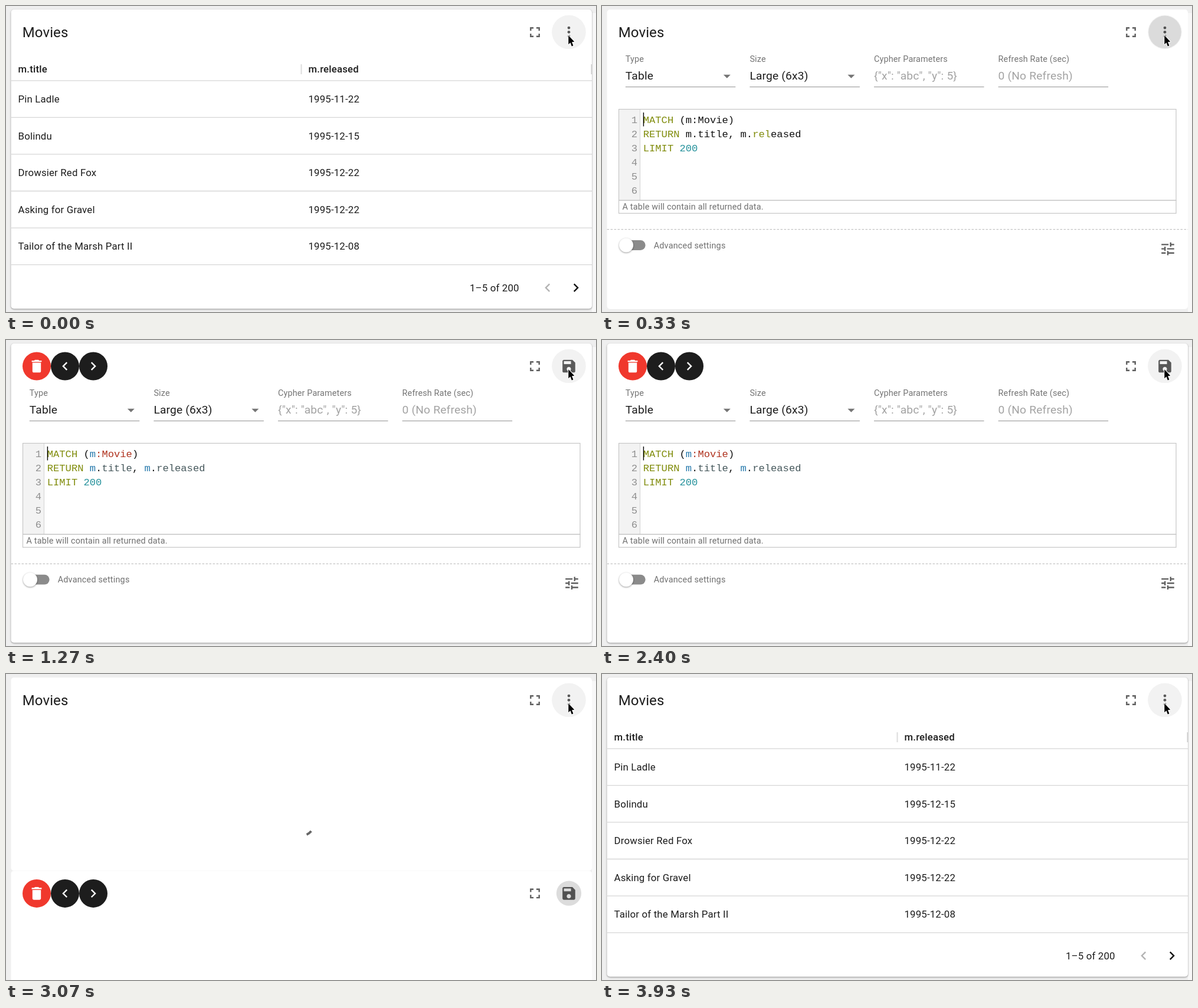
An HTML page with a canvas that plays this animation: 1000x520 px, repeating every 3990 ms.

```html
<!DOCTYPE html>
<html lang="en">
<head>
<meta charset="utf-8">
<title>Movies card</title>
<style>
  html, body { margin: 0; width: 100%; height: 100%; overflow: hidden; background: #efefef; }
  canvas { display: block; width: 1000px; height: 520px; }
</style>
</head>
<body>
<canvas id="stage"></canvas>
<script>
const W = 1000, H = 520, LOOP = 3990, TICK = 200 / 3;
const canvas = document.getElementById('stage');
const ctx = canvas.getContext('2d');
const dpr = window.devicePixelRatio || 1;
canvas.width = W * dpr;
canvas.height = H * dpr;

const SANS = 'Roboto, sans-serif';
const MONO = '"Liberation Mono", monospace';
const ICON = 'rgba(0,0,0,.63)', MUTED = '#757575', INK = '#1c1c1c';
const CARD = { x: 8.5, y: 6, w: 984.5, h: 508.5 };
const MORE = { x: 954, y: 44.3 };
const CLOSE_START = 2917, CLOSE_END = 3279, SPIN_START = 2927;

const ICONS = {
  full: 'M7 14H5v5h5v-2H7v-3zm-2-4h2V7h3V5H5v5zm12 7h-3v2h5v-5h-2v3zM14 5v2h3v3h2V5h-5z',
  left: 'M15.41 7.41L14 6l-6 6 6 6 1.41-1.41L10.83 12z',
  right: 'M10 6L8.59 7.41 13.17 12l-4.58 4.59L10 18l6-6z',
  trash: 'M6 19c0 1.1.9 2 2 2h8c1.1 0 2-.9 2-2V7H6v12zM19 4h-3.5l-1-1h-5l-1 1H5v2h14V4z',
  save: 'M17 3H5c-1.11 0-2 .9-2 2v14c0 1.1.89 2 2 2h14c1.1 0 2-.9 2-2V7l-4-4zm-5 16c-1.66 0-3-1.34-3-3s1.34-3 3-3 3 1.34 3 3-1.34 3-3 3zm3-10H5V5h10v4z',
  tune: 'M3 17v2h6v-2H3zM3 5v2h10V5H3zm10 16v-2h8v-2h-8v-2h-2v6h2zM7 9v2H3v2h4v2h2V9H7zm14 4v-2H11v2h10zm-6-4h2V7h4V5h-4V3h-2v6z',
  drop: 'M7 10l5 5 5-5z'
};
for (const key in ICONS) ICONS[key] = new Path2D(ICONS[key]);

const ROWS = [
  ['Pin Ladle', '1995-11-22'],
  ['Bolindu', '1995-12-15'],
  ['Drowsier Red Fox', '1995-12-22'],
  ['Asking for Gravel', '1995-12-22'],
  ['Tailor of the Marsh Part II', '1995-12-08']
];

const FIELDS = [
  ['Type', 'Table', true],
  ['Size', 'Large (6x3)', true],
  ['Cypher Parameters', '{"x": "abc", "y": 5}', false],
  ['Refresh Rate (sec)', '0 (No Refresh)', false]
];

const C = { k: '#808c0c', n: '#22909a', v: '#2478ab', l: '#b0331f', p: '#46585c', t: '#111' };
const LIMIT = [['k', 'LIMIT '], ['n', '200']];
const PLAIN_CODE = [
  [['k', 'MATCH'], ['t', ' (m:Movie)']],
  [['k', 'RETURN'], ['t', ' m.title, m.'], ['k', 'rel'], ['t', 'eased']],
  LIMIT
];
const CYPHER_CODE = [
  [['k', 'MATCH'], ['t', ' ('], ['v', 'm'], ['l', ':Movie'], ['t', ')']],
  [['k', 'RETURN'], ['v', ' m'], ['t', '.'], ['p', 'title'], ['t', ', '], ['v', 'm'], ['t', '.'], ['p', 'released']],
  LIMIT
];

const clamp = v => Math.max(0, Math.min(1, v));
const ramp = (t, a, b) => clamp((t - a) / (b - a));

function bezier(x1, y1, x2, y2) {
  const at = (a, b, s) => 3 * a * s * (1 - s) ** 2 + 3 * b * s * s * (1 - s) + s ** 3;
  return x => {
    let lo = 0, hi = 1;
    for (let i = 0; i < 24; i++) {
      const mid = (lo + hi) / 2;
      if (at(x1, x2, mid) < x) lo = mid; else hi = mid;
    }
    return at(y1, y2, (lo + hi) / 2);
  };
}
const standard = bezier(.4, 0, .2, 1);
const inOut = bezier(.42, 0, .58, 1);

function text(str, x, y, size, color, { weight = 400, font = SANS, gap = .18, align = 'left' } = {}) {
  ctx.font = `${weight} ${size}px ${font}`;
  ctx.letterSpacing = gap + 'px';
  ctx.textAlign = align;
  ctx.fillStyle = color;
  ctx.fillText(str, x, y);
}

function icon(name, x, y, color) {
  ctx.save();
  ctx.translate(x, y);
  ctx.scale(1.2, 1.2);
  ctx.translate(-12, -12);
  ctx.fillStyle = color;
  ctx.fill(ICONS[name]);
  ctx.restore();
}

function disc(x, y, r, color) {
  ctx.fillStyle = color;
  ctx.beginPath();
  ctx.arc(x, y, r, 0, Math.PI * 2);
  ctx.fill();
}

function line(x1, y1, x2, y2, color, width = 1.2) {
  ctx.strokeStyle = color;
  ctx.lineWidth = width;
  ctx.beginPath();
  ctx.moveTo(x1, y1);
  ctx.lineTo(x2, y2);
  ctx.stroke();
}

function panel(y, h, shadow) {
  ctx.save();
  if (shadow) {
    ctx.shadowColor = 'rgba(0,0,0,.42)';
    ctx.shadowBlur = 2.6 * dpr;
    ctx.shadowOffsetY = 1 * dpr;
  }
  ctx.fillStyle = '#fff';
  ctx.beginPath();
  ctx.roundRect(CARD.x, y, CARD.w, h, 5);
  ctx.fill();
  ctx.restore();
}

function pointer() {
  ctx.save();
  ctx.translate(953.3, 50);
  ctx.scale(.93, .97);
  ctx.beginPath();
  [[0, 0], [0, 15.8], [3.5, 12.6], [6, 19], [8.8, 17.8], [6.2, 11.6], [10.8, 11.2]]
    .forEach(([x, y]) => ctx.lineTo(x, y));
  ctx.closePath();
  ctx.lineJoin = 'round';
  ctx.lineWidth = 2.2;
  ctx.strokeStyle = '#fff';
  ctx.stroke();
  ctx.fillStyle = '#000';
  ctx.fill();
  ctx.restore();
}

function viewHeader() {
  text('Movies', 27.7, 52.5, 24, INK, { gap: .12 });
  icon('full', 896.5, 44.5, ICON);
  for (const dy of [-7.2, 0, 7.2]) disc(MORE.x, MORE.y + dy, 2.4, ICON);
}

function settingsHeader() {
  disc(52, 44.5, 24, '#f0382d');
  disc(100, 44.5, 24, '#1d1d1d');
  disc(148, 44.5, 24, '#1d1d1d');
  icon('trash', 52, 44.5, '#fff');
  icon('left', 100, 44.5, '#fff');
  icon('right', 148, 44.5, '#fff');
  icon('full', 896.5, 44.5, ICON);
  icon('save', MORE.x, 44.5, ICON);
}

function table() {
  const right = CARD.x + CARD.w;
  text('m.title', 20.5, 113, 16.8, INK, { weight: 500 });
  text('m.released', 512.5, 113, 16.8, INK, { weight: 500 });
  line(500.5, 99, 500.5, 116, '#dcdcdc', 2);
  line(992.3, 99, 992.3, 116, '#cfcfcf', 1.6);
  for (let i = 0; i <= ROWS.length; i++) {
    const y = 126.8 + i * 62.56;
    line(CARD.x, y, right, y, '#d6d6d6', 1.3);
  }
  ROWS.forEach(([title, date], i) => {
    const y = 164 + i * 62.56;
    text(title, 20.5, y, 16.8, INK);
    text(date, 512.5, y, 16.8, INK);
  });
  text('1–5 of 200', 786, 484.8, 16.8, INK);
  icon('left', 918, 478.8, '#b3b3b3');
  icon('right', 966, 478.8, '#111');
}

function spinner(t) {
  const turn = Math.PI * 2, len = 126.9, p = (t - SPIN_START) / 1400;
  if (p < 0) return;
  const grow = inOut(clamp(p * 2)), chase = inOut(clamp(p * 2 - 1));
  const start = p + (15 * grow + 110 * chase) / len;
  const dash = Math.min(1 + 99 * grow, len - 15 * grow - 110 * chase) / len;
  ctx.strokeStyle = '#666';
  ctx.lineWidth = 3.9;
  ctx.beginPath();
  ctx.arc(500.3, 253, 22, start * turn, (start + dash) * turn);
  ctx.stroke();
}

function editor(code, caret) {
  ctx.fillStyle = '#f3f3f3';
  ctx.fillRect(28.5, 175.5, 36, 154.5);
  line(64.5, 175.5, 64.5, 330, '#d8d8d8');
  ctx.strokeStyle = '#c6c6c6';
  ctx.lineWidth = 1.2;
  ctx.strokeRect(28.5, 175.5, 944.5, 154.8);
  ctx.strokeRect(28.5, 330.3, 944.5, 22);

  const size = 17.17, advance = size * .6, mono = { font: MONO, gap: 0 };
  for (let i = 0; i < 6; i++) {
    const y = 198.5 + i * 24;
    text(String(i + 1), 60, y, size, '#8f8f8f', { ...mono, align: 'right' });
    let x = 69.7;
    for (const [kind, str] of code[i] || []) {
      text(str, x, y, size, C[kind], mono);
      x += str.length * advance;
    }
  }
  ctx.globalAlpha = caret;
  line(70.4, 181, 70.4, 204.5, '#000', 1.4);
  ctx.globalAlpha = 1;
  text('A table will contain all returned data.', 34.5, 346.3, 14.4, '#707070');
}

function form(code, caret, shift) {
  FIELDS.forEach(([label, value, select], i) => {
    const x = 39.8 + i * 210.6;
    text(label, x, 94.6, 14.4, MUTED, { gap: .14 });
    text(value, x, 125.3, 19.2, select ? INK : '#a3a3a3');
    line(x, 137.5, x + 186.5, 137.5, '#929292');
    if (select) icon('drop', x + 172, 119.2, MUTED);
  });
  editor(code, caret);

  ctx.save();
  ctx.translate(0, shift);
  ctx.setLineDash([3.6, 2.4]);
  line(CARD.x, 380.4, CARD.x + CARD.w, 380.4, '#c4c4c4');
  ctx.setLineDash([]);
  ctx.fillStyle = '#8b8b8b';
  ctx.beginPath();
  ctx.roundRect(33, 398.8, 40.6, 16.8, 8.4);
  ctx.fill();
  ctx.shadowColor = 'rgba(0,0,0,.4)';
  ctx.shadowBlur = 3 * dpr;
  ctx.shadowOffsetY = 1 * dpr;
  disc(41, 407.2, 12, '#fff');
  ctx.shadowColor = 'transparent';
  text('Advanced settings', 87.7, 412.3, 14.4, '#707070', { gap: .2 });
  icon('tune', 959, 413.3, ICON);
  ctx.restore();
}

function caretAlpha(t) {
  const out = ramp(t, 590, 800) + ramp(t, 1790, 2000) + ramp(t, 2520, 2730);
  const back = ramp(t, 990, 1260) + ramp(t, 2120, 2330);
  return clamp(1 - out + back);
}

const hover = () => disc(MORE.x, MORE.y, 28.8, '#f2f2f2');

function viewScene(t) {
  panel(CARD.y, CARD.h, true);
  hover();
  if (t < 320) {
    const grow = ramp(t, 40, 260);
    if (grow > 0) disc(MORE.x, MORE.y, 28 * Math.sqrt(grow), '#dedede');
  }
  viewHeader();
  if (t > 3390 || t < 320) table();
  else spinner(t);
  pointer();
}

function settingsScene(t) {
  const settled = t > 450;
  panel(CARD.y, settled ? CARD.h : 509, settled);
  hover();
  const fade = 1 - ramp(t, 340, 540);
  if (fade > 0) {
    ctx.globalAlpha = fade;
    disc(MORE.x, MORE.y, 27.7, '#dbdbdb');
    ctx.globalAlpha = 1;
  }
  const press = ramp(t, 2810, 3160);
  if (press > 0) disc(MORE.x, MORE.y, 28.8 * press, '#dcdcdc');
  if (t < 390) viewHeader(); else settingsHeader();
  form(t < 590 ? PLAIN_CODE : CYPHER_CODE, caretAlpha(t), settled ? 0 : -.7);
  pointer();
}

// The growing view pushes the emptied settings panel down.
function closingScene(t) {
  const offset = 513 * standard(ramp(t, CLOSE_START, CLOSE_END));
  ctx.save();
  ctx.translate(0, offset);
  panel(CARD.y, 509, false);
  disc(MORE.x, 44.3, 28.8 * ramp(t, 2810, 3160), '#dcdcdc');
  settingsHeader();
  ctx.restore();

  ctx.save();
  ctx.beginPath();
  ctx.rect(0, 0, W, CARD.y + offset);
  ctx.clip();
  panel(CARD.y, offset, false);
  hover();
  viewHeader();
  spinner(t);
  ctx.restore();
  pointer();
}

function draw(t) {
  ctx.setTransform(dpr, 0, 0, dpr, 0, 0);
  ctx.fillStyle = '#efefef';
  ctx.fillRect(0, 0, W, H);
  ctx.fillStyle = '#f8f8f8';
  ctx.fillRect(CARD.x + CARD.w, 12, W, H);
  if (t < 250 || t > 3260) viewScene(t);
  else if (t < CLOSE_START) settingsScene(t);
  else closingScene(t);
}

const begin = performance.now();
function loop() {
  const t = (performance.now() - begin) % LOOP;
  draw(Math.min(59, Math.floor((t + 7) / TICK)) * TICK);
  requestAnimationFrame(loop);
}
loop();
</script>
</body>
</html>
```
